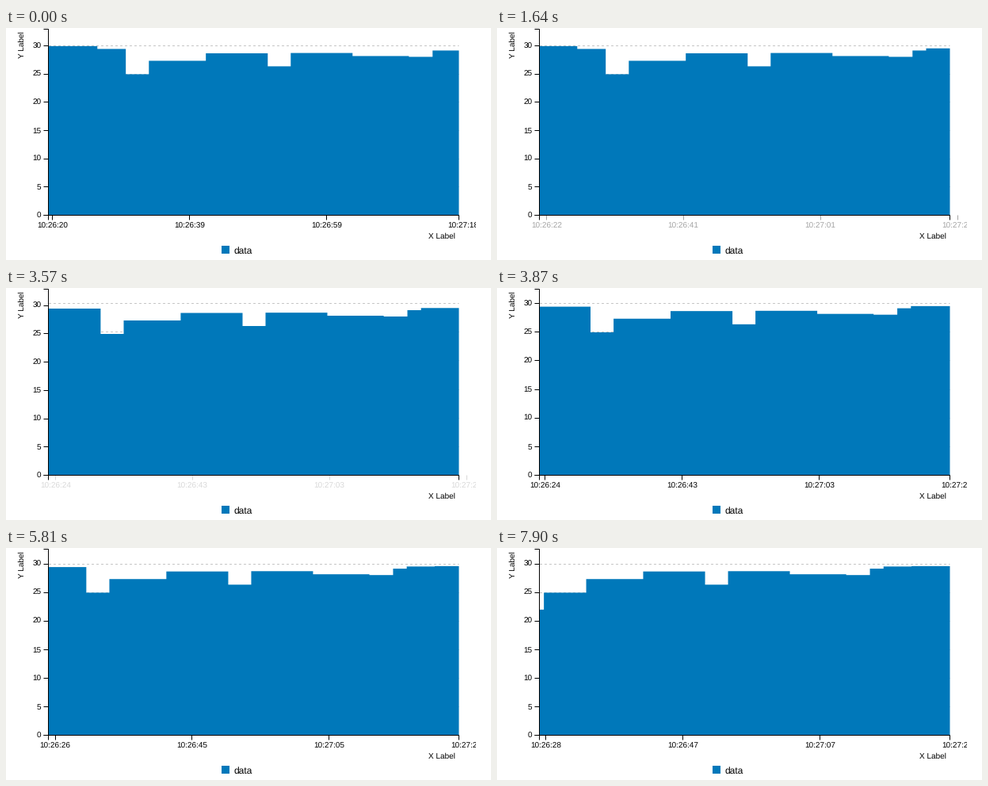
Recreate the animation shown at these times as a matplotlib script. Size 612x293 px, loop 8000 ms.

```python
import matplotlib.pyplot as plt
import numpy as np
from matplotlib.animation import FuncAnimation
from matplotlib.patches import Polygon, Rectangle

W, H, DPI = 612, 293, 100
LOOP, INTERVAL = 8000, 20
LEFT, RIGHT, BASE, TOP = 53.5, 571.5, 236.5, 1.5
BLUE = "#0078ba"
PX = 72 / DPI

# Moments at which the screen repaints.
PAINTS = np.array([0, 150, 300, 450, 1640, 1790, 1940, 2090, 2230, 2380,
                   3570, 3720, 3870, 4020, 4170, 4320, 5520, 5670, 5810,
                   5960, 6110, 6250, 7600, 7750, 7900])

# Each update fades in new ticks, then slides the chart left.
UPDATES = [-400, 1640, 3570, 5520, 7600]
SLIDES = [-88, 1878, 3838, 5804, 7892]
FADE_LEAD, FADE_TIME, SLIDE_TIME, SHIFT = 290, 145, 410, 17.8
PEAKS = [29.95, 29.95, 29.55, 29.62, 29.62]

EDGES = [101.3, 137.2, 166.3, 238.2, 316.3, 345.3, 423.3, 494.4, 524.3,
         541.5, 576.9]
VALUES = [29.95, 29.45, 24.97, 27.35, 28.68, 26.37, 28.73, 28.19, 28.05,
          29.17, 29.55, 29.62]
TICK_START, TICK_STEP = 44.5, 172.9
TICK_SECONDS = [20, 39, 59, 78]

plt.rcParams.update({"font.family": "Liberation Sans", "text.hinting": "none"})
fig = plt.figure(figsize=(W / DPI, H / DPI), dpi=DPI, facecolor="white")
ax = fig.add_axes([0, 0, 1, 1])
ax.set_xlim(0, W)
ax.set_ylim(H, 0)
ax.axis("off")


def line(xs, ys, color="black", z=4, **style):
    return ax.plot(xs, ys, color=color, lw=PX, zorder=z, snap=False,
                   solid_capstyle="butt", dash_capstyle="butt",
                   solid_joinstyle="miter", **style)[0]


def label(x, y, text, size=10, ha="center", **style):
    return ax.text(x, y, text, fontsize=size * PX, ha=ha, va="baseline",
                   color="black", zorder=5, **style)


def crisp(position):
    """Centre of the pixel that holds a position."""
    return np.floor(position) + 0.5


def unit_height(peak):
    return (BASE - TOP) / (peak * 1.1)


def clock(seconds):
    return f"10:{26 + seconds // 60}:{seconds % 60:02d}"


levels = range(0, 35, 5)
grid = [line([LEFT + 0.5, RIGHT], [0, 0], "#c6c6c6", 1, ls=(0, (3, 3)))
        for _ in levels[1:]]
area = ax.add_patch(Polygon([(0, 0)] * 3, fc=BLUE, ec="none", zorder=2,
                            snap=False))
line([LEFT - 6, LEFT, LEFT, LEFT - 6], [TOP, TOP, BASE, BASE])
line([LEFT, LEFT, RIGHT, RIGHT], [BASE + 6, BASE, BASE, BASE + 6])
y_ticks = [line([LEFT - 6, LEFT], [0, 0]) for _ in levels]
y_labels = [label(44.5, 0, str(v), ha="right") for v in levels]
x_ticks = [line([0, 0], [BASE, BASE + 6]) for _ in TICK_SECONDS]
x_labels = [label(0, 252.6, "") for _ in TICK_SECONDS]
ax.add_patch(Rectangle((593, 0), W - 593, H, fc="white", ec="none", zorder=8))

label(567, 266, "X Label", ha="right")
label(23, 4, "Y Label", ha="right", rotation=90, rotation_mode="anchor")
ax.add_patch(Rectangle((272, 275), 10, 10, fc=BLUE, ec="none"))
label(287.5, 285, "data", 12, ha="left")


def steps(cycle, remaining):
    """Step edges on screen and the value before and after each."""
    edges, values = list(EDGES), list(VALUES)
    settled = remaining == 0
    if cycle > 1 or (cycle == 1 and settled):
        values[0] = values[1]
    if cycle > 3 or (cycle == 3 and settled):
        values[:2] = [22, 22]
        edges[1] = 112.9
    known = 9 + (cycle >= 1) + (cycle >= 3)
    moved = np.array(edges[:known]) - SHIFT * cycle + remaining
    return np.clip(moved, LEFT, RIGHT), values[:known + 1]


def draw(frame):
    shown = frame * INTERVAL + INTERVAL / 2
    now = PAINTS[np.searchsorted(PAINTS, shown, side="right") - 1]
    cycle = int(np.searchsorted(UPDATES, now, side="right")) - 1
    elapsed = now - SLIDES[cycle]
    fade = float(np.clip((elapsed + FADE_LEAD) / FADE_TIME, 0, 1))
    remaining = SHIFT * float(np.clip(1 - elapsed / SLIDE_TIME, 0, 1))

    final = unit_height(PEAKS[cycle])
    before = unit_height(PEAKS[max(cycle - 1, 0)])
    unit = before + (final - before) * fade

    for rule, v in zip(grid, levels[1:]):
        rule.set_ydata([crisp(BASE - v * final)] * 2)
    for tick, text, v in zip(y_ticks, y_labels, levels):
        y = BASE - v * unit
        tick.set_ydata([crisp(y)] * 2)
        text.set_y(y + 3.1)

    edges, values = steps(cycle, remaining)
    xs = np.concatenate([[LEFT], np.repeat(edges, 2), [RIGHT]])
    ys = BASE - np.repeat(values, 2) * unit
    area.set_xy([(LEFT, BASE), *zip(xs, ys), (RIGHT, BASE)])

    for i, (tick, text) in enumerate(zip(x_ticks, x_labels)):
        x = TICK_START + i * TICK_STEP + remaining
        tick.set_xdata([crisp(x)] * 2)
        tick.set_alpha(fade)
        tick.set_visible(fade < 1 or LEFT < x < RIGHT)
        text.set_x(x)
        text.set_alpha(fade)
        text.set_text(clock(TICK_SECONDS[i] + 2 * cycle))
    return []


anim = FuncAnimation(fig, draw, frames=LOOP // INTERVAL, interval=INTERVAL,
                     repeat=True, repeat_delay=0, blit=False)
plt.show()
```
